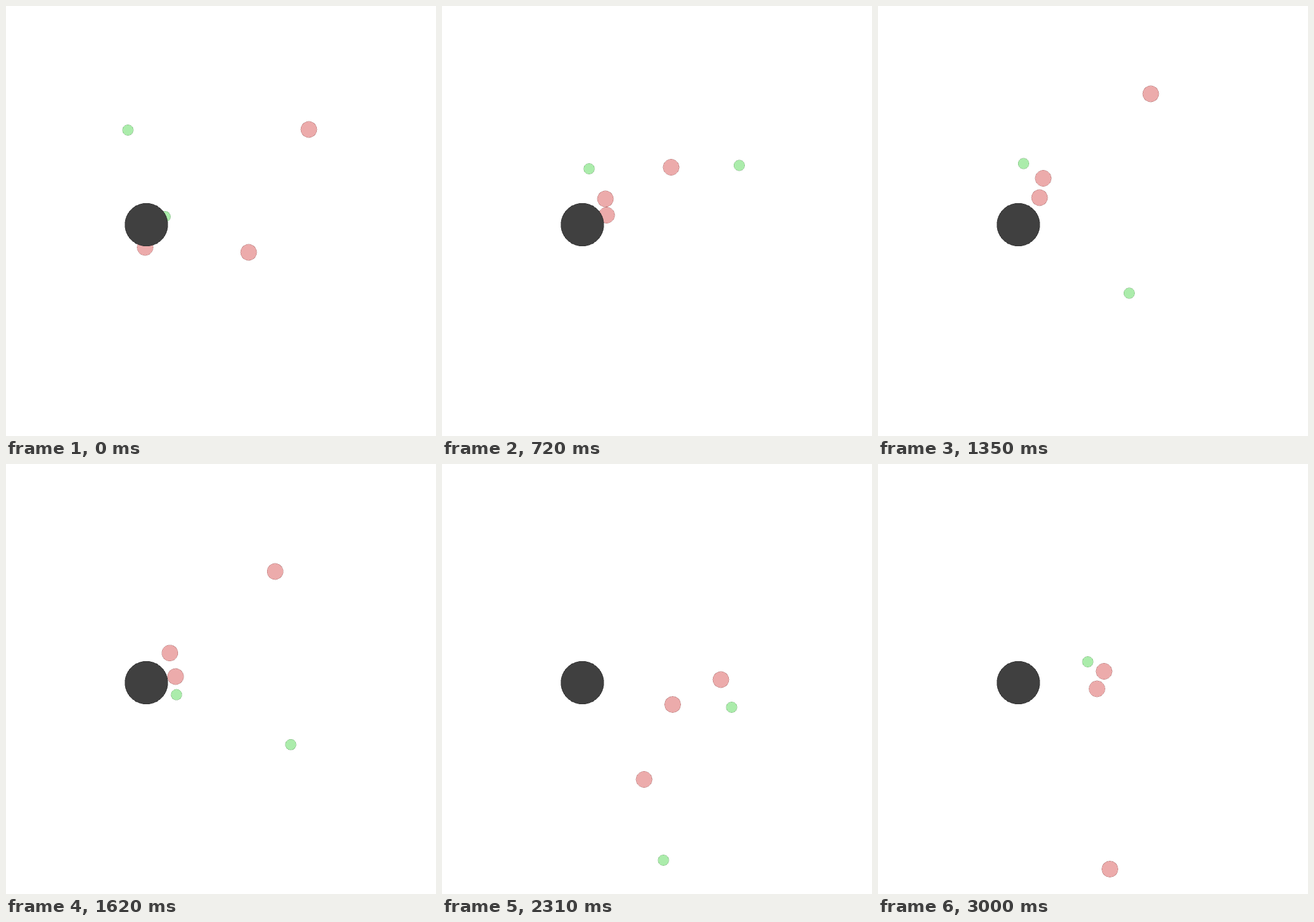
Animation, 700 px wide and 700 px high, one loop 3.03 s. Source, as an HTML page:

```html
<!DOCTYPE html>
<html lang="en">
<head>
<meta charset="utf-8">
<title>Chase</title>
<style>
html, body { margin: 0; width: 100%; height: 100%; overflow: hidden; background: #fff; }
svg { display: block; width: 100vw; height: 100vh; }
polygon { shape-rendering: crispEdges; }
</style>
</head>
<body>
<svg id="stage" viewBox="0 0 700 700"></svg>
<script>
const STEP_MS = 30, STEPS = 101, UNIT = 175;
const KEY_STEPS = [0, 10, 24, 45, 63, 77, 100];

const hunter = { r: 0.075 * UNIT, rgb: [217, 89, 89], alpha: 0.5 };
const runner = { r: 0.05 * UNIT, rgb: [89, 217, 89], alpha: 0.5 };
const rock = { r: 0.2 * UNIT, rgb: [64, 64, 64], alpha: 1 };

// Each mover glides through one key point per key step
const movers = [
  { kind: hunter, path: [[493, 201], [431, 233.5], [373, 262.5], [444, 143], [430, 237], [454, 351], [368, 337.5]] },
  { kind: hunter, path: [[226.5, 393], [262, 389], [268, 340.5], [263, 312], [295, 401], [329, 513.5], [377.5, 659.5]] },
  { kind: hunter, path: [[395, 401], [369, 352], [266, 314], [269, 280.5], [281, 345], [375.5, 391.5], [356.5, 366]] },
  { kind: runner, path: [[198.5, 202], [212.5, 201.5], [239.5, 265], [237, 256.5], [323, 513], [360.5, 645], [402, 712]] },
  { kind: runner, path: [[259, 343], [294, 288], [484, 259.5], [409, 467.5], [515, 422], [471.5, 396], [341.5, 322]] }
];

// Cubic curve whose speed at each key blends the average speeds on both sides
function smoothCurve(times, values) {
  const last = times.length - 1;
  const span = i => times[i + 1] - times[i];
  const speed = i => (values[i + 1] - values[i]) / span(i);
  const tangent = i => {
    if (i === 0) return speed(0);
    if (i === last) return speed(last - 1);
    const before = span(i - 1), after = span(i);
    return (speed(i - 1) * after + speed(i) * before) / (before + after);
  };
  return time => {
    let i = 0;
    while (i < last - 1 && time >= times[i + 1]) i++;
    const h = span(i), u = (time - times[i]) / h, v = 1 - u;
    return v * v * ((1 + 2 * u) * values[i] + u * h * tangent(i)) +
           u * u * ((1 + 2 * v) * values[i + 1] - v * h * tangent(i + 1));
  };
}

function addDisc({ r, rgb, alpha }) {
  const disc = document.createElementNS('http://www.w3.org/2000/svg', 'polygon');
  const points = Array.from({ length: 30 }, (_, i) => {
    const angle = i * Math.PI / 15;
    return `${(r * Math.cos(angle)).toFixed(2)},${(r * Math.sin(angle)).toFixed(2)}`;
  });
  const attributes = {
    points: points.join(' '),
    fill: `rgb(${rgb})`,
    stroke: `rgb(${rgb.map(c => c >> 1)})`,
    'fill-opacity': alpha,
    'stroke-opacity': alpha / 2
  };
  for (const name in attributes) disc.setAttribute(name, attributes[name]);
  return document.getElementById('stage').appendChild(disc);
}

const place = (disc, x, y) => disc.setAttribute('transform', `translate(${x} ${y})`);

for (const mover of movers) {
  mover.x = smoothCurve(KEY_STEPS, mover.path.map(point => point[0]));
  mover.y = smoothCurve(KEY_STEPS, mover.path.map(point => point[1]));
  mover.disc = addDisc(mover.kind);
}
place(addDisc(rock), 228.5, 356);

function draw(ms) {
  const step = Math.floor(ms / STEP_MS) % STEPS;
  for (const { disc, x, y } of movers) place(disc, x(step), y(step));
}

const start = performance.now();
function tick() {
  draw(performance.now() - start);
  requestAnimationFrame(tick);
}
tick();
</script>
</body>
</html>
```
